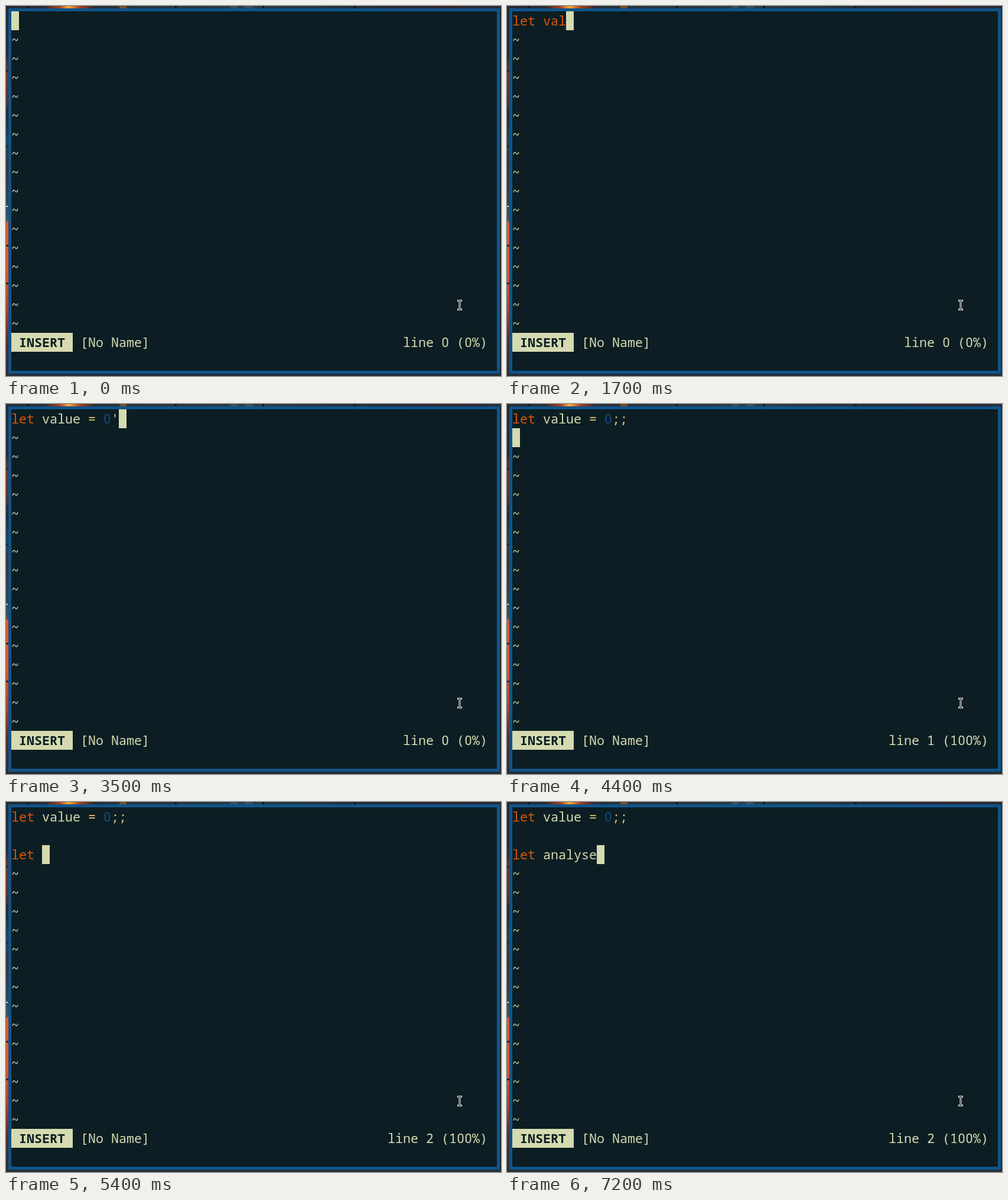
Write an HTML page with a canvas that moves like this. It is 838 px wide and 626 px high and loops after 8 s.

```html
<!DOCTYPE html>
<html lang="en">
<head>
<meta charset="utf-8">
<title>Typing in an editor</title>
<style>
  html, body { margin: 0; width: 100%; height: 100%; overflow: hidden; background: #202832; }
  #backdrop { position: absolute; left: 0; top: 0; }
  #editor {
    position: absolute; left: 4px; top: 4px; width: 822px; height: 608px;
    border: 5px solid #0f548c; background: #0c1e23; color: #d5dab0;
    font: 21.667px/32px "Noto Sans Mono", "DejaVu Sans Mono", monospace;
  }
  .row { position: absolute; left: 0; height: 32px; white-space: pre; }
  .tilde { margin-top: 1px; color: #d0d5ac; font-weight: 300; }
  .key { color: #d95708; }
  .num { color: #144d86; }
  .op { color: #e6c675; }
  .str { color: #a9b665; }
  .zero {
    display: inline-block; width: 13px; text-align: center;
    font-family: Roboto, "Open Sans", sans-serif;
  }
  #caret { position: absolute; width: 13px; height: 32px; background: #d5dab0; }
  #mode { top: 544px; background: #d5dab0; color: #0c1e23; font-weight: 700; }
  #file { top: 544px; left: 117px; }
  #place { top: 544px; left: auto; right: 16px; }
</style>
</head>
<body>
<canvas id="backdrop" width="838" height="626"></canvas>
<div id="editor">
  <div id="caret"></div>
  <div id="rows"></div>
  <div class="row" id="mode"> INSERT </div>
  <div class="row" id="file">[No Name]</div>
  <div class="row" id="place"></div>
</div>
<script>
const LOOP = 8000, CELL = 13, LINE = 32, ROWS = 17;
const $ = id => document.getElementById(id);

// Builds the typing history: each call appends text at a time after erasing some.
const states = [[0, ""]];
function type(time, added, erased = 0) {
  const last = states[states.length - 1][1];
  states.push([time, last.slice(0, last.length - erased) + added]);
}
function typeEach(start, chars) {
  [...chars].forEach((c, i) => type(start + i * 100, c));
}
typeEach(1100, "le");
type(1300, "t ");
typeEach(1500, "value ");
typeEach(2200, "= ");
type(2700, "0");
typeEach(3100, "''");
type(3500, "", 1);
type(3700, "", 1);
typeEach(3800, ";;");
typeEach(4400, "\n\n");
typeEach(5100, "let ");
type(6000, "a");
type(6500, "na");
type(6800, "l");
typeEach(7000, "yse");

const zeros = text => text.replace(/0/g, '<span class="zero">0</span>');

function highlight(line) {
  return line.replace(/\b(?:let|val)\b|0|[=;]|''/g, token => {
    const kind = token === "0" ? "num" : token === "''" ? "str"
      : /[=;]/.test(token) ? "op" : "key";
    return `<span class="${kind}">${zeros(token)}</span>`;
  });
}

function show(text) {
  const lines = text.split("\n"), last = lines.length - 1;
  let html = "";
  for (let r = 0; r < ROWS; r++) {
    const used = r <= last;
    html += `<div class="row${used ? "" : " tilde"}" style="top:${r * LINE}px">` +
      `${used ? highlight(lines[r]) : "~"}</div>`;
  }
  $("rows").innerHTML = html;
  $("caret").style.left = lines[last].length * CELL + "px";
  $("caret").style.top = last * LINE + "px";
  $("place").innerHTML = zeros(`line ${last} (${last ? 100 : 0}%)`);
}

function paintBackdrop() {
  const g = $("backdrop").getContext("2d");
  const box = (color, x, y, w, h) => { g.fillStyle = color; g.fillRect(x, y, w, h); };
  const fade = (x0, y0, x1, y1, stops) => {
    const f = g.createLinearGradient(x0, y0, x1, y1);
    stops.forEach(([at, color]) => f.addColorStop(at, color));
    return f;
  };
  box("#252e39", 0, 0, 838, 626);
  box(fade(0, 0, 838, 0, [[0, "#252b34"], [0.25, "#28323c"], [0.5, "#2b3b48"],
    [0.75, "#232c37"], [0.9, "#33262d"], [1, "#252d38"]]), 0, 0, 838, 4);
  box(fade(65, 0, 150, 0, [[0, "#30282b"], [0.3, "#a8401f"], [0.48, "#ffab38"],
    [0.7, "#a8401f"], [1, "#30282b"]]), 65, 0, 85, 4);
  box("#765026", 192, 0, 12, 4);
  box("#355260", 380, 0, 12, 4);
  box("#355260", 404, 0, 14, 4);
  for (const x of [35, 286, 434, 589]) box("#12171d", x, 0, 3, 4);
  box(fade(0, 0, 0, 626, [[0, "#252a32"], [0.13, "#2c2a2f"], [0.18, "#733620"],
    [0.25, "#603127"], [0.3, "#262b32"], [0.37, "#23465a"], [0.43, "#462e2b"],
    [0.53, "#30444d"], [0.58, "#45545a"], [0.585, "#d65a2b"], [0.72, "#d9562a"],
    [0.82, "#a84328"], [0.9, "#5c2c27"], [1, "#2c2b32"]]), 0, 4, 4, 622);
  for (const y of [108, 174, 236, 404, 468]) box("#25262a", 0, y, 4, 3);
  box("#d4d6c0", 0, 338, 3, 2);
  box("#232b36", 836, 0, 2, 626);
  box("#262d38", 4, 622, 834, 4);
}

function paintPointer() {
  const c = document.createElement("canvas");
  c.width = 12;
  c.height = 22;
  c.style.cssText = "position:absolute;left:762px;top:495px";
  const g = c.getContext("2d");
  const beam = (color, pad) => {
    g.fillStyle = color;
    g.fillRect(3 - pad, 3 - pad, 6 + 2 * pad, 1 + 2 * pad);
    g.fillRect(3 - pad, 18 - pad, 6 + 2 * pad, 1 + 2 * pad);
    g.fillRect(5.5 - pad, 3, 1 + 2 * pad, 16);
  };
  beam("#f4f4f4", 1);
  beam("#080b0d", 0);
  document.body.append(c);
}

let shown = null;
function tick(now) {
  const t = (now - start) % LOOP;
  const current = states.filter(([time]) => time <= t).pop() || states[0];
  if (current !== shown) {
    shown = current;
    show(current[1]);
  }
  requestAnimationFrame(tick);
}

paintBackdrop();
paintPointer();
const start = performance.now();
tick(start);
</script>
</body>
</html>
```
